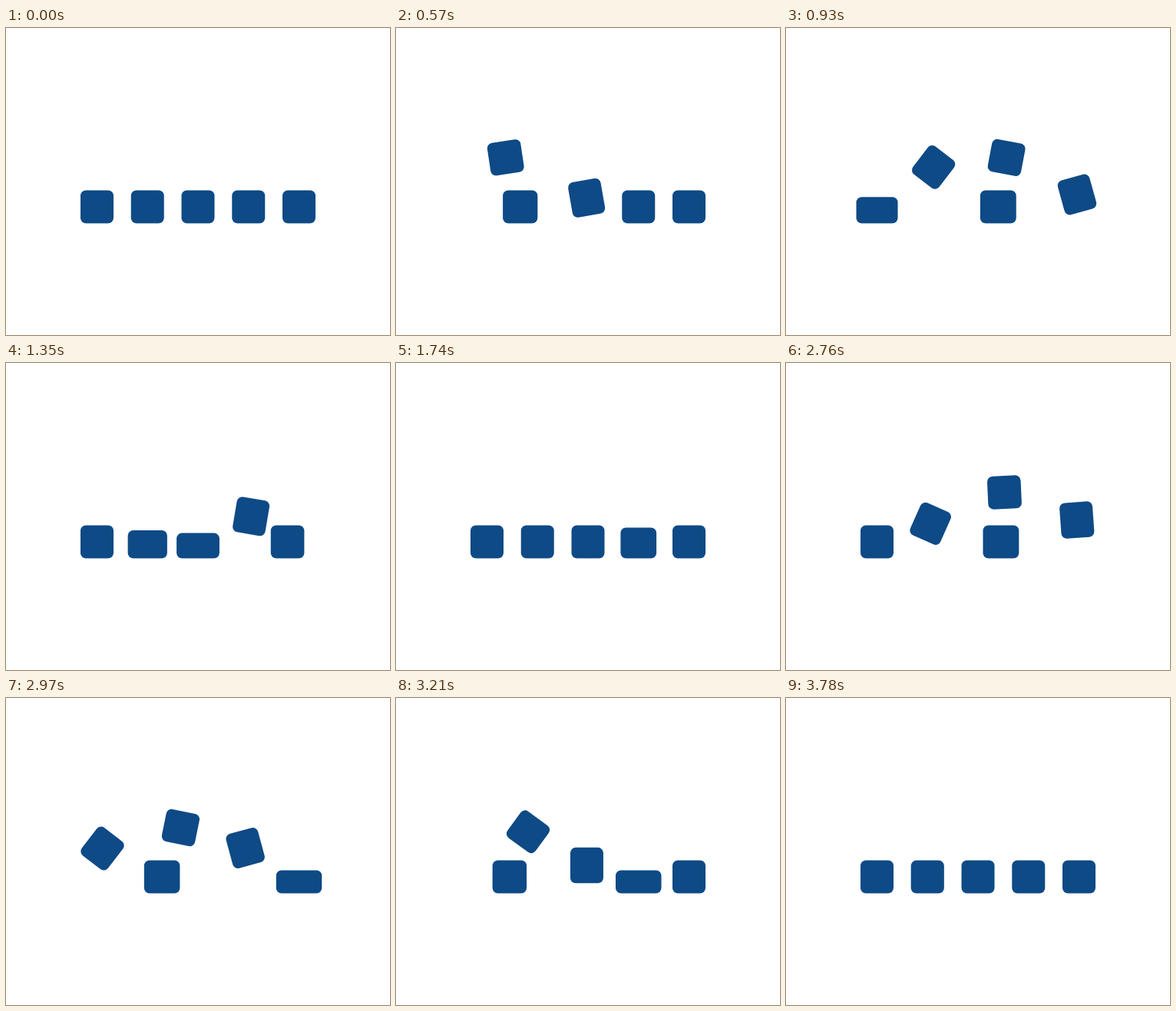
Recreate the animation shown at these times as an HTML page. Size 500x400 px, loop 3.96 s.

```html
<!DOCTYPE html>
<html lang="en">
<head>
<meta charset="utf-8">
<title>Hopping squares</title>
<style>
  html, body { margin: 0; width: 100%; height: 100%; overflow: hidden; background: #fff; }
  svg { display: block; width: 500px; height: 400px; }
  rect { fill: #0e4a86; }
</style>
</head>
<body>
<svg viewBox="0 0 500 400"><g id="row"></g></svg>
<script>
const HALF = 1980, STEP = 30;
const SIZE = 43, RADIUS = 7, LEFT = 118.5, GAP = 65.75, FLOOR = 254.5;
const HOP_DELAYS = [0, 240, 412, 585];
const HOP_HEIGHT = 64.5;

const row = document.getElementById('row');
const boxes = Array.from({ length: 5 }, () =>
  row.appendChild(document.createElementNS('http://www.w3.org/2000/svg', 'rect')));

const clamp = v => Math.min(1, Math.max(0, v));
const span = (t, from, to) => clamp((t - from) / (to - from));

// Cubic bezier easing with end handles (x1, 0) and (x2, 1).
function bezier(x1, x2) {
  return u => {
    let lo = 0, hi = 1;
    for (let i = 0; i < 24; i++) {
      const s = (lo + hi) / 2, r = 1 - s;
      if (3 * x1 * s * r * r + 3 * x2 * s * s * r + s ** 3 < u) lo = s; else hi = s;
    }
    return lo * lo * (3 - 2 * lo);
  };
}
const easeSlide = bezier(0.6, 0.4);
const easeHop = bezier(0.55, 0.25);
const easeSine = u => (1 - Math.cos(Math.PI * u)) / 2;

function place(box, cx, cy, w, h, angle = 0) {
  const attrs = {
    x: -w / 2, y: -h / 2, width: w, height: h, rx: RADIUS,
    transform: `translate(${cx} ${cy}) rotate(${angle})`
  };
  for (const name in attrs) box.setAttribute(name, attrs[name]);
}

function drawSlider(t) {
  const u = span(t, 0, 1720);
  const w = SIZE + 4 * Math.sin(Math.PI * u) ** 4;
  place(boxes[0], LEFT + 4 * GAP * easeSlide(u), FLOOR - SIZE / 2, w, SIZE);
}

function drawHopper(index, t) {
  const x = LEFT + GAP * (index - easeHop(span(t, 228, 948)));
  const lift = HOP_HEIGHT * (t < 539
    ? easeSine(span(t, 252, 532))
    : 1 - span(t, 548, 854) ** 2.1);
  const angle = -180 * span(t, 303, 791);
  const stretch = (0.5 + 3 * Math.abs(Math.cos(angle * Math.PI / 180))) * clamp(lift / 12);
  const squash = easeSlide(span(t, 850, 990)) - easeSine(span(t, 990, 1230));
  const w = SIZE + 16.5 * squash;
  const h = SIZE + stretch - 13 * squash;
  const cy = FLOOR - (SIZE - 13 * squash) / 2 - lift;
  place(boxes[index], x, cy, w, h, angle);
}

function render(time) {
  const t = Math.floor(time / STEP) * STEP;
  const local = t % HALF;
  const mirrored = Math.floor(t / HALF) % 2 === 1;
  row.setAttribute('transform', mirrored ? 'translate(500 0) scale(-1 1)' : '');
  drawSlider(local);
  HOP_DELAYS.forEach((delay, i) => drawHopper(i + 1, local - delay));
}

const start = performance.now();
function tick() {
  render(performance.now() - start);
  requestAnimationFrame(tick);
}
tick();
</script>
</body>
</html>
```
